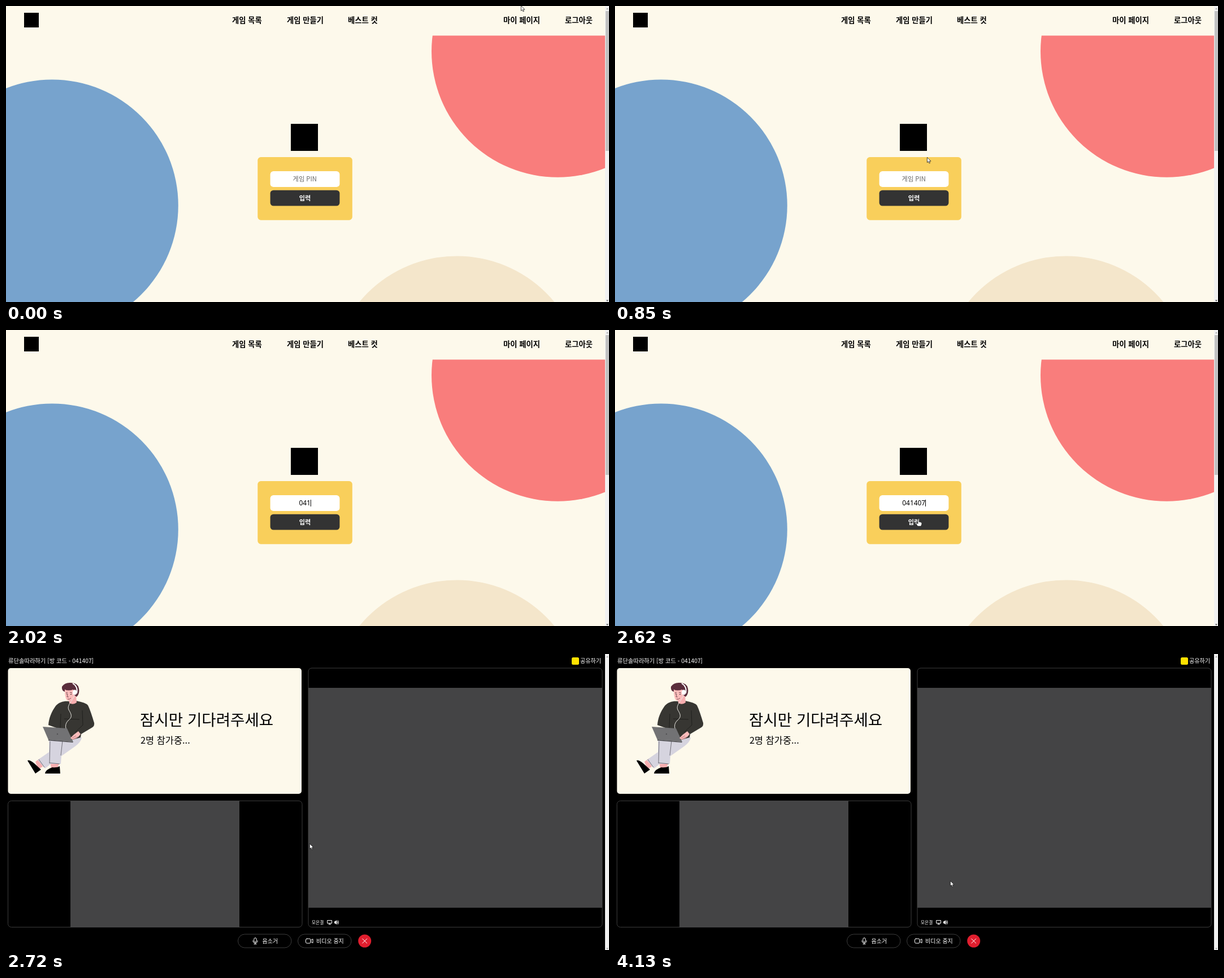
Animation, 1067 px wide and 525 px high, one loop 4180 ms. Source, as an HTML page:

```html
<!DOCTYPE html>
<html lang="ko">
<head>
<meta charset="utf-8">
<style>
  html, body { margin: 0; width: 100%; height: 100%; overflow: hidden; background: #fdf9eb; }
  svg { display: block; width: 100%; height: 100%; }
  text { font-family: "Noto Sans CJK KR", "Noto Sans CJK", sans-serif; white-space: pre; }
  .mid { text-anchor: middle; }
  .nav { font-size: 13.3px; font-weight: 700; }
  .digits { font-family: "Noto Sans", sans-serif; font-size: 11.9px; }
  .line { fill: none; stroke: #fff; stroke-width: 1; stroke-linecap: round; stroke-linejoin: round; }
  .frame { fill: #000; stroke: #3c3c3c; stroke-width: 1; }
</style>
</head>
<body>
<svg viewBox="0 0 1067 525">
  <g id="home">
    <rect width="1067" height="525" fill="#fdf9eb"/>
    <circle cx="81.5" cy="353.8" r="223.3" fill="#77a3cd"/>
    <circle cx="976.3" cy="80.5" r="223.3" fill="#f97d7c"/>
    <circle cx="797.8" cy="666.7" r="223.3" fill="#f4e6cb"/>
    <rect width="1060" height="52.5" fill="#fdf9eb"/>
    <rect x="32" y="12" width="26" height="26"/>
    <g class="nav">
      <text x="400" y="30">게임 목록</text>
      <text x="497" y="30">게임 만들기</text>
      <text x="605" y="30">베스트 컷</text>
      <text x="880" y="30">마이 페이지</text>
      <text x="989" y="30">로그아웃</text>
    </g>
    <rect x="504" y="209" width="48" height="48"/>
    <rect x="445.3" y="268" width="167.5" height="111.7" rx="5.6" fill="#f9cf5b"/>
    <rect x="467.6" y="293.1" width="122.8" height="27.9" rx="5.6" fill="#fff"/>
    <rect x="467.6" y="326.7" width="122.8" height="27.9" rx="5.6" fill="#333"/>
    <text id="hint" class="mid" x="528.7" y="311" font-size="11.2" fill="#666">게임 PIN</text>
    <text id="pin" class="mid digits" x="528.7" y="311"></text>
    <rect id="caret" y="301" width="1" height="12"/>
    <text class="mid" x="529" y="345" font-size="11.2" font-weight="700" fill="#fff">입력</text>
  </g>

  <g id="room">
    <rect width="1067" height="525"/>
    <g fill="#fff">
      <text x="4" y="16" font-size="10.3">류단솔따라하기 [방 코드 - 041407]</text>
      <text x="1016" y="16" font-size="10.1">공유하기</text>
    </g>
    <rect x="1001" y="6" width="13" height="13" rx="2.5" fill="#ffe100"/>
    <rect x="3.5" y="25" width="519.5" height="223" rx="5" fill="#fdf9eb"/>
    <text x="237" y="126.5" font-size="27.6" font-weight="500">잠시만 기다려주세요</text>
    <text x="238" y="158.5" font-size="16.4" font-weight="500">2명 참가중...</text>

    <g id="listener" stroke-linejoin="round">
      <path d="M52 191L60 185L65 200L57 204ZM78 192H95L91 202H80Z" fill="#f7aeb0"/>
      <path d="M38 189Q41 187 50 194L62 205L52 212ZM69 212Q70 205 82 201Q90 202 95 199L96 212Z"/>
      <path d="M134 148Q133 156 122 164L98 181L69 203L56 188L76 174L78 148Z" fill="#d6d4df"/>
      <path d="M76 150H100L97 195H77Z" fill="#d6d4df"/>
      <path d="M100 154L97 180M78 155L77 194M77 193L95 195M58 187L68 201" fill="none" stroke="#55535c" stroke-width=".8"/>
      <path d="M112 84C103 83 94 85 88 92C80 103 76 114 75 126L92 132L108 155L132 148L133 142L153 130Q157 127 156 122C153 112 149 99 145 91Q141 86 124 83Z" fill="#373632"/>
      <path d="M97 106L96 131M135 100L136 126L122 139M103 115L130 116" fill="none" stroke="#1b1b19" stroke-width=".8"/>
      <path d="M111 78L124 74L125 86Q119 91 112 87Z" fill="#f7aeb0"/>
      <path d="M104 64Q104 76 107 81Q114 86 120 78L125 72L124 58L106 58Z" fill="#fbbcbb"/>
      <path d="M104 67Q98 65 99 58Q104 50 115 51Q127 51 129 61Q131 70 125 76L121 73L119 63Q110 66 104 63Z" fill="#5a2d3b"/>
      <path d="M118 52Q128 58 125 70" fill="none" stroke="#fff" stroke-width="2"/>
      <ellipse cx="121.5" cy="68" rx="3.6" ry="4.5" fill="#fff"/>
      <path d="M106 69L109 68M113 68L117 69M109 72L108 76H111M109 80Q113 81 115 78" fill="none" stroke="#59303a" stroke-width=".8"/>
      <circle cx="108" cy="71" r=".8"/><circle cx="115" cy="71.5" r=".8"/>
      <path d="M121 73C118 84 107 90 111 99C116 107 118 112 110 118Q104 124 106 132" fill="none" stroke="#e8e6e0"/>
      <path d="M65 129L108 132L119 156L75 152Z" fill="#727274"/>
      <path d="M75 152L119 156L118 157L75 153.5Z" fill="#454547"/>
      <circle cx="91" cy="142" r="1.2" fill="#505052"/>
      <path d="M128 137L132 142Q127 150 118 152L114 149L120 143Z" fill="#fbbcbb"/>
      <path d="M117 149L124 145M119 151L127 147" stroke="#8d4c55" stroke-width=".6"/>
    </g>

    <rect class="frame" x="3.5" y="260.5" width="520.5" height="224" rx="6"/>
    <rect x="114" y="260" width="299" height="225" fill="#444445"/>
    <rect class="frame" x="535" y="25" width="520" height="459.5" rx="6"/>
    <rect id="video" x="535" y="60" width="520" height="390" fill="#444445"/>
    <text x="541" y="478.7" font-size="7.7" fill="#fff">모은결</text>
    <path class="line" d="M569 472.5H576.5V477.5H569ZM571 479.5H574.5M572.8 478V479"/>
    <path d="M581 474.3H582.5L585 472V480L582.5 477.7H581Z" fill="#fff"/>
    <path class="line" d="M586.2 474.3Q587.5 476 586.2 477.7M587 472.5Q590 476 587 479.5"/>

    <rect class="frame" x="410.5" y="497" width="94.5" height="24" rx="12"/>
    <rect class="frame" x="516.5" y="497" width="94.5" height="24" rx="12"/>
    <rect class="line" x="438.8" y="503.5" width="4.4" height="7.5" rx="2.2"/>
    <path class="line" d="M437 508.5V509.5Q437.5 512.5 441 512.5T445 509.5V508.5M441 513V514.5M439 514.5H443"/>
    <rect class="line" x="530.5" y="505" width="8.5" height="8" rx="2"/>
    <path class="line" d="M539.5 508L543 505.5V512.5L539.5 510"/>
    <g fill="#fff" font-size="10">
      <text x="453.5" y="512.5">음소거</text>
      <text x="549" y="512.5">비디오 중지</text>
    </g>
    <circle cx="634.7" cy="509" r="11.5" fill="#e01e2e"/>
    <path class="line" d="M630.7 505L638.7 513M638.7 505L630.7 513"/>
  </g>

  <g id="scrollbar">
    <rect x="1060" width="7" height="525" fill="#f1f1f1"/>
    <rect id="thumb" x="1061" y="9" width="6" height="248" fill="#c1c1c1"/>
    <path d="M1062 6L1064 3.5L1066 6Z" fill="#a3a3a3"/>
    <path id="down" d="M1062 521.5L1064 524L1066 521.5Z"/>
  </g>

  <g id="pointer">
    <path id="arrow" d="M.4 .5V9.6L2.5 7.7L4 11L5.5 10.3L4.1 7.2H7Z" fill="#fff" stroke="#000" stroke-width=".7"/>
    <path id="beam" d="M-2.5 -5.5H-.7L0 -5L.7 -5.5H2.5M0 -5V5M-2.5 5.5H-.7L0 5L.7 5.5H2.5" fill="none" stroke="#222" stroke-width=".9"/>
    <path id="hand" d="M-1 .5Q0 -1 1 .5V4.5Q2 3.8 2.8 4.8Q3.8 4.2 4.4 5.3Q5.6 5 5.8 6.3V8.5L4.5 12H-1.5L-3.8 8.3Q-4.8 6.6 -3.5 6.3Q-2.5 6.2 -1 8Z" fill="#fff" stroke="#000" stroke-width=".6"/>
  </g>
</svg>
<script>
  const LOOP = 4180, STEP = 50;
  const ROOM_AT = 2670, VIDEO_AT = 2720;
  const PIN = "041407", KEYS = [1790, 1890, 1970, 2070, 2170, 2220];
  const FOCUS_AT = 1690;

  // The screen refreshes every STEP ms, counted from these moments.
  const BURSTS = [0, 1140, 1690, 2220, 3290, 3680];

  // time, x, y of the pointer tip
  const PATH = [
    [0, 911, -1], [50, 842, 52], [100, 768, 118], [150, 704, 169], [200, 660, 146],
    [300, 660, 146], [350, 640, 168], [450, 592, 218], [550, 563, 250], [700, 544, 269],
    [850, 552, 268], [1090, 552, 268], [1340, 548, 273.5], [1540, 543, 288], [1640, 540, 296],
    [2220, 540, 296], [2520, 537, 336], [3240, 537, 336], [3440, 539, 324], [3630, 539, 324],
    [3730, 542, 318], [3930, 569, 352], [4130, 593, 402]
  ];

  const el = Object.fromEntries([...document.querySelectorAll("[id]")].map(n => [n.id, n]));
  const show = (node, on) => node.setAttribute("display", on ? "inline" : "none");

  function quantize(t) {
    const start = BURSTS.filter(b => b <= t).pop();
    return start + Math.floor((t - start) / STEP) * STEP;
  }

  function pointerAt(t) {
    const i = PATH.findIndex(p => p[0] > t);
    if (i < 0) return PATH[PATH.length - 1].slice(1);
    const [t0, x0, y0] = PATH[i - 1], [t1, x1, y1] = PATH[i];
    const k = (t - t0) / (t1 - t0);
    return [x0 + (x1 - x0) * k, y0 + (y1 - y0) * k];
  }

  function render(t) {
    const inRoom = t >= ROOM_AT;
    show(el.home, !inRoom);
    show(el.room, inRoom);
    show(el.video, t >= VIDEO_AT);
    show(el.thumb, !inRoom);
    el.down.setAttribute("fill", inRoom ? "#a3a3a3" : "#505050");

    const typed = KEYS.filter(k => k <= t).length;
    el.pin.textContent = PIN.slice(0, typed);
    show(el.hint, !typed);
    show(el.caret, t >= FOCUS_AT);
    el.caret.setAttribute("x", 528.6 + typed * 3.4);

    const [x, y] = pointerAt(quantize(t));
    const overField = !inRoom && y >= 293 && y < 321;
    const overButton = !inRoom && y >= 327;
    show(el.beam, overField);
    show(el.hand, overButton);
    show(el.arrow, !overField && !overButton);
    show(el.pointer, t < KEYS[0] || t >= 2270);
    el.pointer.setAttribute("transform", `translate(${x} ${y})`);
  }

  const begin = performance.now();
  function tick() {
    render((performance.now() - begin) % LOOP);
    requestAnimationFrame(tick);
  }
  tick();
</script>
</body>
</html>
```
